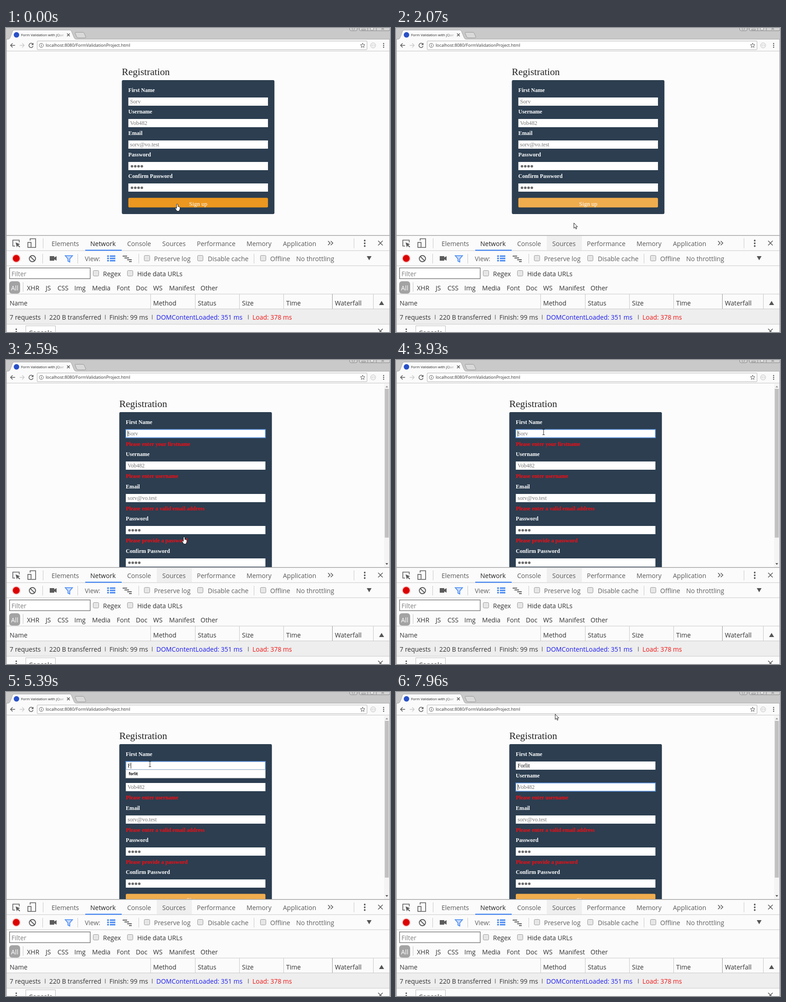
Recreate the animation shown at these times as an HTML page. Size 843x665 px, loop 8 s.

```html
<!DOCTYPE html>
<html lang="en">
<head>
<meta charset="utf-8">
<title>Form validation</title>
<style>
  html, body { margin: 0; width: 100%; height: 100%; overflow: hidden; background: #fcfcfc; }
  svg { display: block; width: 843px; height: 665px; }
  text { font: 14px "Open Sans", "Noto Sans", sans-serif; fill: #333; }
  .tabs text { fill: #5a5a5a; }
  .tools text { fill: #606060; }
  #page text { font: 12.1px "Liberation Serif", serif; }
  #page .title { font-size: 21.5px; fill: #222; }
  #page .label, #page .error { font-weight: bold; fill: #fff; }
  #page .error { fill: #fb0a10; }
  #page .hint { fill: #757575; }
  #page .typed { fill: #111; }
  #page .button { font-size: 12.9px; fill: #fff; }
  #page .option { font: bold 8px "Open Sans", sans-serif; fill: #000; }
  .line { fill: none; stroke: #c8c8c8; }
  .icon { fill: none; stroke: #5c5c5c; stroke-width: 1.6; }
  .check rect { fill: #e6e6e6; stroke: #9a9a9a; }
</style>
</head>
<body>
<svg viewBox="0 0 843 665">
  <defs>
    <clipPath id="viewport"><rect y="51" width="843" height="402"/></clipPath>
    <linearGradient id="fade" x1="110" x2="130" gradientUnits="userSpaceOnUse">
      <stop stop-color="#222"/><stop offset="1" stop-color="#222" stop-opacity=".1"/>
    </linearGradient>
  </defs>

  <!-- Browser frame -->
  <rect width="843" height="25" fill="#c9c9c9"/>
  <g fill="#d4d4d4" stroke="#858585">
    <path d="M754.5-2V3q0 3 3 3H768q3 0 3-3V-2M775.5-2V3q0 3 3 3H840q3 0 3-3V-2M794-2V6M813-2V6"/>
    <path d="M760 3.5v-3h5v3zM781 2.5h8v2h-8zM800 0h7v4h-7zM824 0l6 4m0-4l-6 4" fill="#fff"/>
  </g>
  <path d="M0 24.5H5Q8 24 9.5 20L14 8Q15 4.5 18 4.5H140Q143 4.5 144 8L149 20Q150.500 24.5 154 24.5H843V51H0Z" fill="#fafafa" stroke="#a8a8a8"/>
  <path d="M153 9.5H169Q171 9.5 172 12L175 19Q176 21.5 173 21.5H159Q156 21.5 155 19L152 12Q151 9.5 153 9.5Z" fill="#d9d9d9" stroke="#999"/>
  <circle cx="23" cy="15" r="6" fill="#2850c8"/>
  <text x="33" y="17.5" style="font-size:7.8px;fill:url(#fade)">Form Validation with jQue</text>
  <path d="M134 12l6 6m0-6l-6 6" class="icon"/>
  <rect x="68.5" y="28.5" width="724" height="19" rx="1.5" fill="#fff" stroke="#b4b4b4"/>
  <text x="87" y="41.3" style="font-size:9.35px">localhost:8080/FormValidationProject.html</text>
  <g class="icon" style="stroke-width:1.5">
    <path d="M20 38H10m4.5-4.5L10 38l4.5 4.5"/>
    <path d="M30 38H40m-4.5-4.5L40 38l-4.5 4.5" stroke="#ccc"/>
    <path d="M59 35.5A4.7 4.7 0 1 0 59.5 39.5M59.5 33V36.5H56"/>
    <circle cx="77.5" cy="38" r="4.5" stroke-width="1"/><path d="M77.5 37v3.5M77.5 35v1" stroke-width="1.2"/>
    <path d="M783 33l1.4 3.3 3.6.3-2.7 2.4.8 3.5-3.1-1.9-3.1 1.9.8-3.5-2.7-2.4 3.6-.3z" stroke-width="1"/>
    <circle cx="806" cy="38" r="5.5" stroke="#bbb" stroke-width="1"/>
    <path d="M805 35.5q-1 0-1 1.5t-1 1q1 0 1 1t1 1.5m2-5q1 0 1 1.5t1 1q-1 0-1 1t-1 1.5" stroke="#bbb" stroke-width="1"/>
  </g>
  <g fill="#555"><circle cx="829" cy="34" r="1.3"/><circle cx="829" cy="38" r="1.3"/><circle cx="829" cy="42" r="1.3"/></g>
  <path d="M0 51H843" stroke="#b8b8b8"/>

  <g id="page" clip-path="url(#viewport)"></g>

  <!-- Developer tools -->
  <rect y="453" width="843" height="212" fill="#fbfbfb"/>
  <path d="M0 453.8H843" stroke="#a3a3a3" stroke-width="1.6"/>
  <rect id="hover" x="331" y="455" width="77" height="31" fill="#efefef"/>
  <rect y="615" width="843" height="33" fill="#eee"/>
  <path class="line" d="M0 487H843M0 520H843M0 582H843M0 614.5H843M0 648H843M81.5 460v22M764 460v22M80.5 494v21M157.5 494v21M291.5 494v21M544.5 494v21M37.5 556v21M317.5 582v32M415.5 582v32M512.5 582v32M609.5 582v32M806.5 582v32"/>
  <path d="M716.5 582v32" stroke="#999"/>
  <rect x="174" y="485" width="80" height="2.3" fill="#4285f4"/>

  <g class="tabs" transform="translate(0 476.5)">
    <text x="100">Elements</text><text x="185" style="fill:#222">Network</text><text x="266">Console</text>
    <text x="343">Sources</text><text x="419">Performance</text><text x="528">Memory</text><text x="608">Application</text>
  </g>
  <g class="icon">
    <path d="M29 469V464H15V477H20"/><path d="M21 469l10 4-4 1.5 4 4-1.5 1.5-4-4-1.7 4z" fill="#5c5c5c" stroke="none"/>
    <path d="M53 465V461H65V480H56"/><rect x="48" y="469" width="7" height="11"/>
    <path d="M707 466l4.5 4.5-4.5 4.5m6-9l4.5 4.5-4.5 4.5"/>
    <path d="M817 465.5l10 10m0-10l-10 10M817 658l10 10m0-10l-10 10"/>
  </g>
  <g fill="#5c5c5c"><circle cx="787.5" cy="465" r="1.9"/><circle cx="787.5" cy="471" r="1.9"/><circle cx="787.5" cy="477" r="1.9"/></g>

  <circle cx="22.5" cy="504" r="9.5" fill="#f8caca"/><circle cx="22.5" cy="504" r="7.5" fill="#dc0000"/>
  <g class="icon" style="stroke-width:2"><circle cx="58" cy="504.5" r="6.8"/><path d="M53.5 500l9 9"/></g>
  <path d="M96 499h10v3l5-3v10l-5-3v3H96z" fill="#5c5c5c"/>
  <path d="M130 498h16l-6 7v7l-4-2v-5z" fill="#c7dafb" stroke="#4285f4" stroke-width="1.6"/>
  <path d="M222 499h4m2 0h12m-18 5h4m2 0h12m-18 5h4m2 0h12" stroke="#4285f4" stroke-width="3"/>
  <path d="M256 499h10m-6 4h10m-4 4h10m-6 4h6" stroke="#5c5c5c" stroke-width="2"/>
  <g class="tools" transform="translate(0 510)">
    <text x="173">View:</text><text x="325">Preserve log</text><text x="443">Disable cache</text>
    <text x="580">Offline</text><text x="637">No throttling</text>
  </g>
  <path d="M792 499h10.5l-5.25 9z" fill="#555"/>
  <g class="check">
    <rect x="303.5" y="497.5" width="12" height="12" rx="2"/><rect x="420.5" y="497.5" width="12" height="12" rx="2"/>
    <rect x="558.5" y="497.5" width="12" height="12" rx="2"/><rect x="191.5" y="530.5" width="12" height="12" rx="2"/>
    <rect x="266.5" y="530.5" width="12" height="12" rx="2"/>
  </g>
  <rect x="7.8" y="524.8" width="177" height="23.5" fill="#fff" stroke="#858585" stroke-width="1.6"/>
  <g transform="translate(0 542.5)">
    <text x="12" style="fill:#808080">Filter</text><text x="213">Regex</text><text x="288">Hide data URLs</text>
  </g>
  <rect x="7" y="554" width="24" height="27" rx="6" fill="#a3a3a3"/>
  <g transform="translate(0 573.5)">
    <text x="11" style="fill:#fff">All</text><text x="46">XHR</text><text x="87">JS</text><text x="113">CSS</text>
    <text x="150">Img</text><text x="189">Media</text><text x="243">Font</text><text x="285">Doc</text>
    <text x="323">WS</text><text x="358">Manifest</text><text x="427">Other</text>
  </g>
  <g transform="translate(0 606.5)">
    <text x="8">Name</text><text x="323">Method</text><text x="421">Status</text>
    <text x="518">Size</text><text x="615">Time</text><text x="722">Waterfall</text>
  </g>
  <path d="M819 606h11l-5.5-9z" fill="#555"/>
  <g transform="translate(0 637.5)">
    <text x="8">7 requests</text><text x="95">220 B transferred</text><text x="227">Finish: 99 ms</text>
    <text x="330" style="fill:#1c1cf0">DOMContentLoaded: 351 ms</text><text x="541" style="fill:#f01414">Load: 378 ms</text>
    <path d="M86 -10V0M218 -10V0M321 -10V0M532 -10V0" stroke="#444"/>
  </g>
  <path d="M43.5 665V651.5H108.5V665" fill="#fff" stroke="#bbb"/>
  <text x="50" y="672">Console</text>
  <g fill="#5c5c5c"><circle cx="22.5" cy="659" r="1.7"/><circle cx="22.5" cy="664.5" r="1.7"/></g>
  <path d="M.8 25V665M842.5 25V665" stroke="#a8a8a8" stroke-width="1.6"/>

  <path id="cursor" stroke="#222"/>
</svg>
<script>
const LOOP = 8000;
const FIRST_NAME = "Forlit";
const SUBMITTED = 2590, MENU_OPENED = 4220, TABBED = 6850;
const SHAPES = {
  hand: ["M-1.5 .8Q0-.8 1.5 .8V5.5L3 5.6 4.5 6.2 6 7.2V11L4.5 14V15.5H-1.5V14L-4.5 9.8Q-4.5 7.8-3 8.4L-1.5 10Z", "#fff"],
  arrow: ["M0 0V11.5L2.7 9 4.5 13.3 6.3 12.5 4.5 8.4H8Z", "#fff"],
  beam: ["M-2.5-6H2.5M0-6V6M-2.5 6H2.5", "none"],
};
// Each entry: start time, cursor shape, hotspot x, hotspot y
const MOVES = [
  [0, "hand", 376, 385], [130, "hand", 381, 384.5], [270, "hand", 385, 385],
  [1080, "beam", 382, 346], [1220, "beam", 376, 252], [1360, "arrow", 370, 146],
  [1500, "arrow", 374, 222], [1640, "arrow", 381, 325], [1780, "arrow", 389, 415],
  [1930, "arrow", 393, 464], [2070, "arrow", 390.5, 426.5],
  [2200, "arrow", 391, 402], [2330, "hand", 391, 387],
  [2870, "beam", 387, 370], [3000, "arrow", 379, 335], [3130, "beam", 371, 303],
  [3250, "arrow", 365, 278], [3380, "arrow", 361, 264],
  [3660, "beam", 348, 229], [3800, "arrow", 333, 184], [3930, "beam", 324, 157.5],
  [4540, "beam", 319, 157.5], [4690, "beam", 316, 157.5], [7960, "arrow", 349.5, 48.5],
];
const TYPING = [[0, 0], [5390, 1], [5680, 2], [5830, 3], [5980, 4], [6120, 6]];
// The caret restarts its blink whenever the field is focused, clicked or edited
const CARET_RESETS = [[SUBMITTED], [4160], ...TYPING.slice(1), [TABBED]];
const BLINK = 532;
const BUTTON = [[0, "#ec971f"], [1080, "#f0ad4e"], [2330, "#ec971f"], [2460, "#d58512"], [SUBMITTED, "#f0ad4e"]];
const FIELDS = [
  ["First Name", "Sorv", "Please enter your firstname"],
  ["Username", "Vob482", "Please enter username"],
  ["Email", "sorv@vo.test", "Please enter a valid email address"],
  ["Password", "", "Please provide a password"],
  ["Confirm Password", "", ""],
];
const OPTIONS = ["forlit", "fsfs", "dvsdv", "dasds", "fsfvd", "forlit"];

const page = document.getElementById("page");
const cursor = document.getElementById("cursor");
const hover = document.getElementById("hover");
const ruler = document.createElement("canvas").getContext("2d");
ruler.font = '12.1px "Liberation Serif", serif';

const at = (steps, t) => steps.findLast(step => step[0] <= t);
const text = (x, y, kind, value) => `<text x="${x}" y="${y}" class="${kind}">${value}</text>`;
const rect = (x, y, w, h, fill, extra = "") =>
  `<rect x="${x}" y="${y}" width="${w}" height="${h}" fill="${fill}" ${extra}/>`;

function caretVisible(t) {
  const reset = at(CARET_RESETS, t);
  return reset && Math.floor((t - reset[0]) / BLINK) % 2 === 0;
}

function drawField(x, y, hint, typed, focused, caret) {
  let out = rect(x, y, 306.5, 18, "#fff", focused ? 'stroke="#5b94e0" stroke-width="1.6"' : "");
  if (typed) out += text(x + 4, y + 13, "typed", typed);
  else if (hint) out += text(x + 4, y + 13, "hint", hint);
  else for (let i = 0; i < 4; i++) out += `<circle cx="${x + 8 + i * 7.2}" cy="${y + 9.5}" r="2.8" fill="#6b6b6b"/>`;
  if (focused && caret) out += rect(x + 4 + ruler.measureText(typed).width, y + 2.5, 1, 13, "#222");
  return out;
}

function drawMenu(x, options) {
  const height = options.length * 17.2 + 1;
  return rect(x, 170, 306.5, height, "#fff", 'stroke="#b8b8b8" stroke-width=".8"') +
    (options.length > 1 ? rect(x, 187, 306.5, 1, "#ccc") : "") +
    options.map((name, i) => text(x + 6.5, 182 + i * 17.1, "option", name)).join("");
}

function drawScrollbar(bottom) {
  return rect(830, 52, 12, 401, "#f4f4f4") + rect(831.5, 63, 9, bottom - 63, "#c1c1c1") +
    '<path d="M833 60h6l-3-3.5z" fill="#999"/><path d="M833 444.5h6l-3 3.5z" fill="#444"/>';
}

function drawPage(t) {
  const checked = t >= SUBMITTED;
  const typed = FIRST_NAME.slice(0, at(TYPING, t)[1]);
  const focus = !checked ? -1 : t < TABBED ? 0 : 1;
  const panelX = checked ? 248.7 : 254.3;
  const x = panelX + 14.3;
  let top = 152, rows = "";

  FIELDS.forEach(([label, hint, error], i) => {
    const value = i === 0 ? typed : "";
    const y = Math.round(top);
    rows += text(x, y - 11.7, "label", label) + drawField(x, y, hint, value, i === focus, caretVisible(t));
    if (checked && error && !value) {
      rows += text(x, y + 35.7, "error", error);
      top += 23.3;
    }
    top += 47.1;
  });
  const buttonY = top - 16;
  rows += rect(x, buttonY, 306.5, 21, at(BUTTON, t)[1], 'rx="2.5"') +
    text(x + 133.5, buttonY + 17.3, "button", "Sign up");

  let out = rect(0, 51, 843, 402, "#fcfcfc") + text(panelX, 103, "title", "Registration") +
    rect(panelX, 114, 335, buttonY - 78.5, "#2c3e50", 'rx="3"') + rows;
  if (checked) out += drawScrollbar(typed ? 406 : 388.5);
  if (t >= MENU_OPENED && t < TABBED) out += drawMenu(x, typed ? OPTIONS.slice(0, 1) : OPTIONS);
  return out;
}

let shown = "";
function render(t) {
  const markup = drawPage(t);
  if (markup !== shown) page.innerHTML = shown = markup;
  hover.style.display = t >= 1930 ? "" : "none";

  const [, shape, x, y] = at(MOVES, t);
  const [path, fill] = SHAPES[shape];
  cursor.setAttribute("d", path);
  cursor.setAttribute("fill", fill);
  cursor.setAttribute("transform", `translate(${x} ${y})`);
}

const start = performance.now();
function tick() {
  render((performance.now() - start) % LOOP);
  requestAnimationFrame(tick);
}
tick();
</script>
</body>
</html>
```
